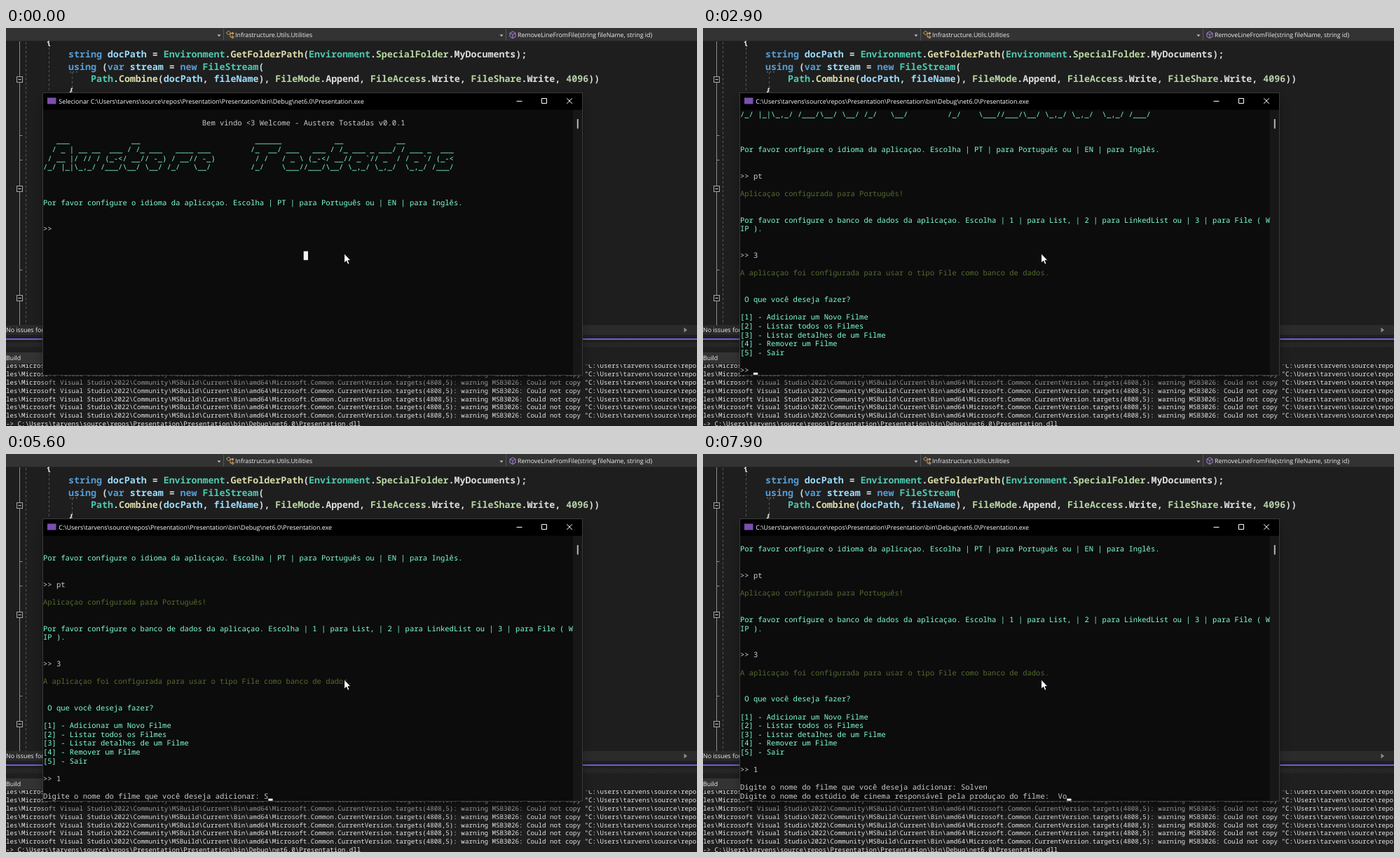
An HTML page for the animation above (8 s loop, 986x568 px).

```html
<!DOCTYPE html>
<html lang="pt">
<head>
<meta charset="utf-8">
<title>Console</title>
<style>
html, body { margin: 0; width: 100%; height: 100%; overflow: hidden; background: #1e1e1e; }
svg { display: block; width: 986px; height: 568px; }
text { white-space: pre; text-rendering: geometricPrecision; }
.ui { font-family: "Open Sans", sans-serif; font-size: 8.85px; }
.code { font-family: "Noto Sans Mono", monospace; font-size: 13.3px; font-weight: 600; }
.log { font-family: "Noto Sans Mono", monospace; font-size: 9.18px; font-weight: 500; }
.term { font-family: "Noto Sans Mono", monospace; font-size: 10.5px; }
</style>
</head>
<body>
<svg id="stage" viewBox="0 0 986 568">
  <defs>
    <pattern id="grip" width="3.15" height="3.15" patternUnits="userSpaceOnUse">
      <rect width="1" height="1" fill="#434346"/>
      <rect x="1.6" y="1.6" width="1" height="1" fill="#434346"/>
    </pattern>
    <filter id="blur" x="-10%" y="-10%" width="120%" height="120%">
      <feGaussianBlur stdDeviation="8"/>
    </filter>
    <clipPath id="body"><rect x="53" y="117" width="769" height="378.6"/></clipPath>
    <clipPath id="output"><rect y="480" width="986" height="88"/></clipPath>
  </defs>
  <rect width="986" height="568" fill="#1e1e1e"/>
  <g id="editor"></g>
  <g id="panel"></g>
  <rect x="56" y="104" width="763" height="405" fill="#000" opacity=".55" filter="url(#blur)"/>
  <g id="window"></g>
  <g clip-path="url(#body)"><g id="buffer"></g></g>
  <rect id="selection" x="424.7" y="318.6" height="12.6" fill="#f2f2f2"/>
  <path d="M482.7 322v13.2l3-2.8 2.1 4.9 2.2-1-2.1-4.6h4.1z" fill="#fff" stroke="#000" stroke-width=".8"/>
</svg>
<script>
const $ = id => document.getElementById(id);
const CELL = 6.3, ROW = 12.6, LEFT = 53, TOP = 117, LOOP = 8000;

function add(parent, tag, attrs, text) {
  const el = document.createElementNS("http://www.w3.org/2000/svg", tag);
  for (const k in attrs) el.setAttribute(k, attrs[k]);
  if (text !== undefined) el.textContent = text;
  parent.appendChild(el);
  return el;
}
const rect = (p, x, y, width, height, fill) => add(p, "rect", { x, y, width, height, fill });
const path = (p, d, stroke, extra) => add(p, "path", { d, stroke, fill: "none", ...extra });
const label = (p, cls, x, y, fill, text) => add(p, "text", { class: cls, x, y, fill }, text);

// Code editor
const editor = $("editor");
const ink = { k: "#569cd6", v: "#9cdcfe", t: "#4ec9b0", m: "#dcdcaa", e: "#b8d7a3", n: "#b5cea8", p: "#dcdcdc" };
function codeLine(x, y, ...parts) {
  const line = label(editor, "code", x, y, ink.p);
  for (const part of parts) add(line, "tspan", { fill: ink[part[0]] }, part.slice(1));
}
path(editor, "M28.5 20V424M61.5 28V424M94.5 63V92", "#5a5a5a", { "stroke-dasharray": "3.2 3.2" });
path(editor, "M19.5 19V424M19.5 153.5h4M19.5 188.5h4M19.5 345.5h4", "#8c8c8c");
for (const y of [74, 230, 386]) {
  add(editor, "rect", { x: 15.5, y: y - 4.5, width: 8, height: 8, fill: "#1e1e1e", stroke: "#a5a5a5" });
  path(editor, `M17.5 ${y - .5}h4`, "#d0d0d0");
}
codeLine(57, 24, "p{");
codeLine(89, 41.8, "kstring ", "vdocPath ", "p= ", "tEnvironment", "p.", "mGetFolderPath", "p(",
  "tEnvironment", "p.", "eSpecialFolder", "p.MyDocuments);");
codeLine(89, 59.5, "kusing ", "p(", "kvar ", "vstream ", "p= ", "knew ", "tFileStream", "p(");
codeLine(121, 77.2, "tPath", "p.", "mCombine", "p(", "vdocPath", "p, ", "vfileName", "p), ",
  "eFileMode", "p.Append, ", "eFileAccess", "p.Write, ", "eFileShare", "p.Write, ", "n4096", "p))");
codeLine(89, 94.9, "p{");
path(editor, "M91 62.8h12", "#a0a0a0", { "stroke-dasharray": "1.5 3" });

// Navigation bar
rect(editor, 0, 0, 986, 18.4, "#333333");
path(editor, "M310.5 1V18M713.5 1V18", "#555555");
for (const x of [304, 707]) add(editor, "path", { d: `M${x - 2.5} 9.5h5l-2.5 2.8z`, fill: "#c8c8c8" });
path(editor, "M314.5 7l3-3 3 3-3 3zM320 7.5h5M320 8v5h3M323 6l2 1.5-2 2zM323 11l2.5 2-2.5 2z", "#d7a85f");
path(editor, "M719 7.3l4-2.3 4 2.3v5l-4 2.3-4-2.3zM719 7.3l4 2.2 4-2.2M723 9.5v5", "#a884d8");
label(editor, "ui", 327, 13.2, "#f0f0f0", "Infrastructure.Utils.Utilities");
label(editor, "ui", 730, 13.2, "#f0f0f0", "RemoveLineFromFile(string fileName, string id)");

// Status strip and build output
const panel = $("panel");
rect(panel, 0, 424, 986, 14, "#2b2b2b");
label(panel, "ui", 0, 434.3, "#f0f0f0", "No issues found");
add(panel, "path", { d: "M967.5 427.5v7l4.5-3.5z", fill: "#8c8c8c" });
rect(panel, 0, 438, 986, 130, "#1f1f1f");
rect(panel, 0, 443, 986, 2, "#6c5fd0");
rect(panel, 0, 449, 986, 6.3, "url(#grip)");
rect(panel, 0, 463, 120, 16, "#333333");
label(panel, "ui", 0, 474.2, "#f0f0f0", "Build");
const log = add(panel, "g", { "clip-path": "url(#output)" });
const warning = "les\\Microsoft Visual Studio\\2022\\Community\\MSBuild\\Current\\Bin\\amd64\\Microsoft.Common.CurrentVersion.targets(4808,5): "
  + "warning MSB3026: Could not copy \"C:\\Users\\tarvens\\source\\repos";
const exe = "C:\\Users\\tarvens\\source\\repos\\Presentation\\Presentation\\bin\\Debug\\net6.0\\Presentation";
for (let i = 0; i < 7; i++) label(log, "log", 0, 485.4 + i * 11.8, "#e6e6e6", warning);
label(log, "log", 0, 568, "#e6e6e6", "-> " + exe + ".dll");

// Console window
const win = $("window");
add(win, "rect", { x: 52.5, y: 92.5, width: 770, height: 403, fill: "#0c0c0c", stroke: "#3a3a3a" });
rect(win, 53, 93, 769, 23.6, "#000");
rect(win, 809, 117, 13, 378, "#171717");
rect(win, 814.8, 130, 2, 13.5, "#b4b4b4");
rect(win, 59, 99.5, 12.5, 9, "#7a4fb0");
path(win, "M728.5 104.5h8M764.5 100.5h7v7h-7zM800.3 100.3l7.6 7.6M807.9 100.3l-7.6 7.6", "#fff");
const title = label(win, "ui", 75.3, 107.6, "#fff", "");
title.style.fontSize = "8.95px";

// Console buffer: each piece of text appears at its own time
const AQUA = "#7fffd4", OLIVE = "#556b2f", GREY = "#cccccc";
const buffer = $("buffer"), pieces = [];
function put(from, row, text, fill = AQUA, col = 0) {
  const el = label(buffer, "term", LEFT + col * CELL, TOP + row * ROW + 9.6, fill, text);
  pieces.push({ el, from });
}
function type(row, col, text, times) {
  [...text].forEach((ch, i) => put(times[i], row, ch, GREY, col + i));
}

const glyphs = {
  A: "   ___ ~  / _ |~ / __ |~/_/ |_|",
  T: " ______~/_  __/~ / /   ~/_/    ",
  a: "      ~ ___ _~/ _ `/~\\_,_/ ",
  d: "     __~ ___/ /~/ _  / ~\\_,_/  ",
  e: "     ~ ___ ~/ -_)~\\__/ ",
  o: "     ~ ___ ~/ _ \\~\\___/",
  r: "      ~  ____~ / __/~/_/   ",
  s: "     ~  ___~ (_-<~/___/",
  t: "  __ ~ / /_~/ __/~\\__/ ",
  u: "      ~ __ __~/ // /~\\_,_/ "
};
const banner = (word, row) => [...word].map(c => glyphs[c].split("~")[row]).join("");

put(0, 1, "Bem vindo <3 Welcome - Austere Tostadas v0.0.1", GREY, 36);
for (let i = 0; i < 4; i++) put(0, 3 + i, banner("Austere", i).padEnd(47) + banner("Tostadas", i));
put(0, 10, "Por favor configure o idioma da aplicaçao. Escolha | PT | para Português ou | EN | para Inglês.");
put(0, 13, ">>", GREY);
type(13, 3, "pt", [1100, 1200]);
put(1400, 15, "Aplicaçao configurada para Português!", OLIVE);
put(1400, 18, "Por favor configure o banco de dados da aplicaçao. Escolha | 1 | para List, | 2 | para LinkedList ou | 3 | para File ( W");
put(1400, 19, "IP ).");
put(1400, 22, ">>", GREY);
type(22, 3, "3", [2900]);
put(2900, 24, "A aplicaçao foi configurada para usar o tipo File como banco de dados.", OLIVE);
put(2900, 27, " O que você deseja fazer?");
["Adicionar um Novo Filme", "Listar todos os Filmes", "Listar detalhes de um Filme", "Remover um Filme", "Sair"]
  .forEach((item, i) => put(2900, 29 + i, `[${i + 1}] - ${item}`));
put(2900, 35, ">>", GREY);
type(35, 3, "1", [4300]);
put(4600, 37, "Digite o nome do filme que você deseja adicionar:", GREY);
type(37, 50, "Solven", [5600, 5700, 6000, 6100, 6200, 6400]);
put(6800, 38, "Digite o nome do estúdio de cinema responsável pela produçao do filme:", GREY);
type(38, 72, "Vo", [7800, 7900]);

const caret = add(buffer, "rect", { width: CELL, height: 3, fill: "#f2f2f2" });
// [time, row, column]; no row means hidden
const carets = [
  [0], [400, 13, 3], [900], [1100, 13, 4], [1200, 13, 5], [1400], [1500, 22, 3],
  [2900, 35, 3], [3600], [4100, 35, 3], [4300, 35, 4], [4600, 37, 50], [5200],
  [5600, 37, 51], [5700], [6000, 37, 53], [6100, 37, 54], [6200, 37, 55],
  [6400, 37, 56], [6800, 38, 72], [7800, 38, 73], [7900, 38, 74]
];
const scrolls = [[0, 0], [2900, 6], [4600, 8], [6800, 9]];
const at = (steps, t) => steps.filter(s => s[0] <= t).pop();
const show = (el, on) => el.setAttribute("visibility", on ? "visible" : "hidden");

function draw(t) {
  const selecting = t < 1100;
  title.textContent = (selecting ? "Selecionar " : "") + exe + ".exe";
  show($("selection"), selecting);
  $("selection").setAttribute("width", CELL * (t < 100 ? 1 : 10));
  for (const p of pieces) show(p.el, t >= p.from);
  buffer.setAttribute("transform", `translate(0 ${-ROW * at(scrolls, t)[1]})`);
  const [, row, col] = at(carets, t);
  show(caret, row !== undefined);
  if (row !== undefined) {
    caret.setAttribute("x", LEFT + col * CELL);
    caret.setAttribute("y", TOP + row * ROW + 9.4);
  }
}
function tick() {
  draw(performance.now() % LOOP);
  requestAnimationFrame(tick);
}
tick();
</script>
</body>
</html>
```
